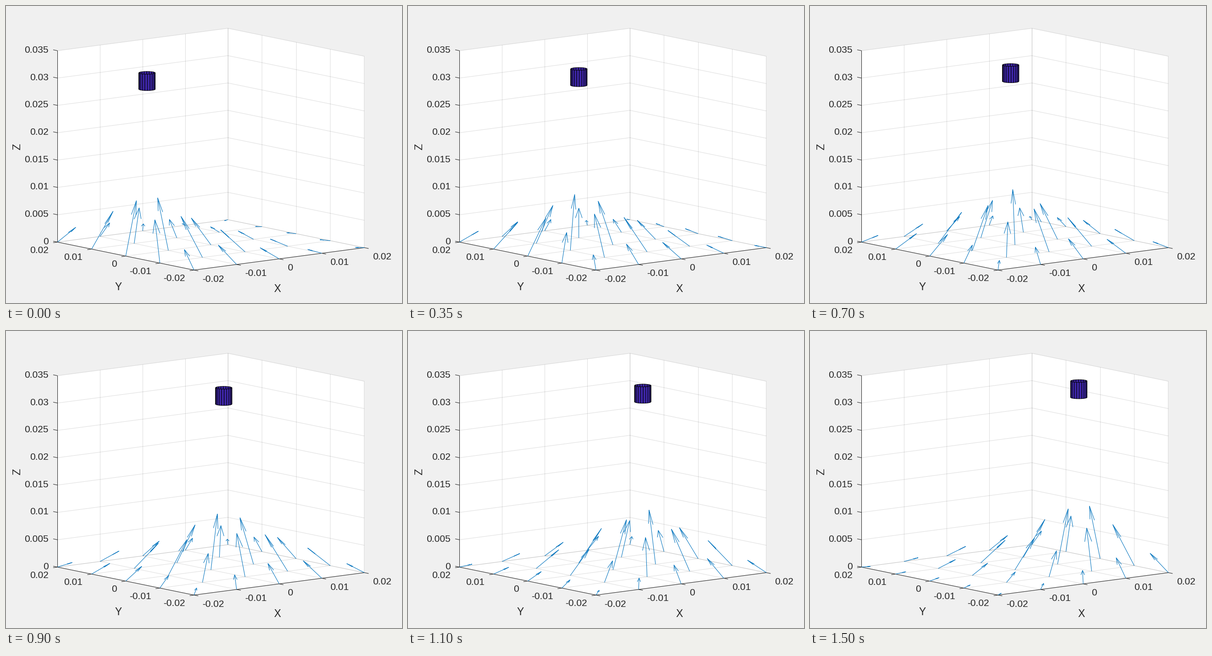
These frames come from a looping animation (864 by 648 pixels, 1.55 s). A matplotlib script:

```python
import numpy as np
import matplotlib.pyplot as plt
from matplotlib.animation import FuncAnimation
from matplotlib.collections import LineCollection, PolyCollection

W, H, DPI = 864, 648, 100
FRAMES, INTERVAL = 31, 50
PX = 72 / DPI                 # points per pixel
LINE = 1.04 * PX
INK, BLUE, PURPLE = "#262626", "#0072BD", "#3E26A8"
LIM, TOP = 0.02, 0.035
DIPOLE_Z = 0.03               # also the bottom of the magnet

# Orthographic view: pixels per metre along each data axis
ORIGIN = np.array([410.16, 576.1])
EX = np.array([9294.0, -1222.0])
EY = np.array([-7446.0, -1525.0])
EZ = np.array([0.0, -11931.0])


def project(p):
    p = np.asarray(p, float)
    return (ORIGIN + (p[..., :1] + LIM) * EX + (p[..., 1:2] + LIM) * EY
            + p[..., 2:3] * EZ)


fig = plt.figure(figsize=(W / DPI, H / DPI), dpi=DPI, facecolor="#F0F0F0")
ax = fig.add_axes([0, 0, 1, 1])
ax.set_xlim(0, W)
ax.set_ylim(H, 0)
ax.axis("off")

ticks = np.linspace(-LIM, LIM, 5)
zticks = np.linspace(0, TOP, 8)


def add_lines(lines, **style):
    """Line collection that puts upright lines on the pixel they cross."""
    lines = [np.array(p) for p in lines]
    for p in lines:
        if abs(p[0, 0] - p[1, 0]) < 1e-6:
            p[:, 0] = np.floor(p[0, 0]) + 0.5
    ax.add_collection(LineCollection(lines, colors=INK, linewidths=LINE,
                                     snap=False, **style))


def label(x, y, text, ha, px=20.83):
    """Text whose digits are centred vertically on y."""
    ax.text(x, y + 0.355 * px, text, ha=ha, va="baseline", color=INK,
            family="Liberation Sans", size=px * PX)


def draw_box():
    outline = [(-LIM, LIM, 0), (-LIM, -LIM, 0), (LIM, -LIM, 0),
               (LIM, -LIM, TOP), (LIM, LIM, TOP), (-LIM, LIM, TOP)]
    ax.add_collection(PolyCollection([project(outline)], facecolors="white",
                                     edgecolors="none", zorder=0))
    grid = []
    for t in ticks:
        grid += [[(t, -LIM, 0), (t, LIM, 0)], [(-LIM, t, 0), (LIM, t, 0)],
                 [(t, LIM, 0), (t, LIM, TOP)], [(LIM, t, 0), (LIM, t, TOP)]]
    for z in zticks:
        grid += [[(-LIM, LIM, z), (LIM, LIM, z)],
                 [(LIM, -LIM, z), (LIM, LIM, z)]]
    add_lines(project(grid), alpha=0.15, zorder=1)


def draw_axes():
    lines = list(project([[(-LIM, LIM, 0), (-LIM, LIM, TOP)],
                          [(-LIM, LIM, 0), (-LIM, -LIM, 0)],
                          [(-LIM, -LIM, 0), (LIM, -LIM, 0)]]))

    def tick(point, direction):
        p = project(point)
        lines.append([p, p + 9.5 * direction / np.hypot(*direction)])
        return p

    for t in ticks:
        name = f"{t:g}"
        x, y = tick((t, -LIM, 0), -EY)
        label(x + 18.4, y + 18.2, name, "left")
        x, y = tick((-LIM, t, 0), -EX)
        label(x - 19.3, y + 16.4, name, "right")
    for z in zticks:
        x, y = tick((-LIM, LIM, z), EY)
        label(x - 19.4, y - 2.8, f"{z:g}", "right")

    add_lines(lines, zorder=2)
    label(592.5, 615.5, "X", "center", 22.9)
    label(245.5, 612, "Y", "center", 22.9)
    ax.text(31, 307, "Z", rotation=90, rotation_mode="anchor", ha="center",
            va="baseline", color=INK, family="Liberation Sans",
            size=22.9 * PX)


def magnet_faces():
    """Side faces of an open cylinder at x = 0, farthest first."""
    r, height, n = 0.0015, 0.003, 20
    angle = 2 * np.pi * np.arange(n + 1) / n
    ring = np.stack([r * np.cos(angle), r * np.sin(angle),
                     np.full(n + 1, DIPOLE_Z)], axis=1)
    lid = ring + [0, 0, height]
    faces = np.stack([ring[:-1], ring[1:], lid[1:], lid[:-1]], axis=1)
    nearness = faces.mean(axis=1) @ [EY[0], -EX[0], 0]
    return faces[np.argsort(nearness)]


gx, gy = np.meshgrid(ticks, ticks)
tails = np.stack([gx.ravel(), gy.ravel(), np.zeros(gx.size)], axis=1)
MAX_LEN = 0.9 * np.hypot(0.008, 0.008)
MAX_HEAD = 0.00264


def field(mx):
    """Vertical dipole field at the floor points, longest arrow normalised."""
    r = tails - [mx, 0, DIPOLE_Z]
    d = np.linalg.norm(r, axis=1, keepdims=True)
    b = 3 * r[:, 2:] * r / d**5 - np.array([0, 0, 1]) / d**3
    return b * MAX_LEN / np.linalg.norm(b, axis=1).max()


def arrows(mx):
    b = field(mx)
    tips = tails + b
    size = np.linalg.norm(b, axis=1, keepdims=True)
    head = np.minimum(0.33, MAX_HEAD / size)
    side = np.stack([b[:, 1], -b[:, 0], 0 * b[:, 0]], axis=1)
    side /= np.linalg.norm(side, axis=1, keepdims=True) + 1e-12
    base = tips - head * b
    wing = 0.25 * head * size * side
    shafts = project(np.stack([tails, tips], axis=1))
    heads = project(np.stack([base + wing, tips, base - wing], axis=1))
    return list(shafts) + list(heads)


draw_box()
draw_axes()
faces = magnet_faces()
quiver = LineCollection([], colors=BLUE, linewidths=LINE, zorder=3)
magnet = PolyCollection([], facecolors=PURPLE, edgecolors="black",
                        linewidths=LINE, zorder=4)
ax.add_collection(quiver)
ax.add_collection(magnet)


def update(i):
    mx = -0.015 + 0.001 * i
    quiver.set_segments(arrows(mx))
    magnet.set_verts(project(faces + [mx, 0, 0]))
    return quiver, magnet


anim = FuncAnimation(fig, update, frames=FRAMES, interval=INTERVAL,
                     repeat=True, repeat_delay=0)
plt.show()
```
